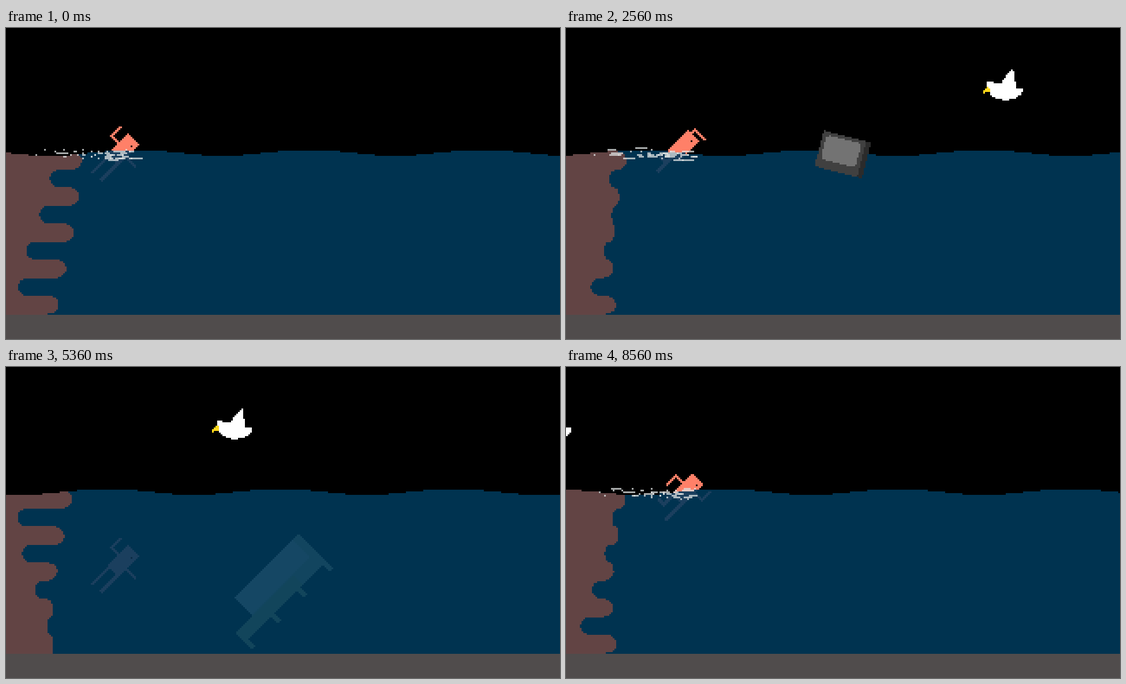
Animation, 960 px wide and 540 px high, one loop 8640 ms. Source, as an HTML page with a canvas:

```html
<!DOCTYPE html>
<html lang="en">
<head>
<meta charset="utf-8">
<title>Swimmer</title>
<style>
html, body { margin: 0; width: 100%; height: 100%; overflow: hidden; background: #000; }
canvas { display: block; width: 960px; height: 540px; }
</style>
</head>
<body>
<canvas id="stage" width="960" height="540"></canvas>
<script>
const ctx = document.getElementById('stage').getContext('2d');
const CELL = 3, COLS = 320, STEP = 80, STEPS = 108;
const SEA = '#003350', FLOOR = '#504c4c', GOO = '#624444';
const CORAL = '#ff8068', DIM = '#1b3f5e';
let step = 0;

const clamp = (v, lo, hi) => Math.max(lo, Math.min(hi, v));
const rand = (a, b) => {
  const v = Math.sin(a * 127.1 + b * 311.7 + 4.2) * 43758.5453;
  return v - Math.floor(v);
};

function cells(x, y, w, h, color) {
  ctx.fillStyle = color;
  ctx.fillRect(x * CELL, y * CELL, w * CELL, h * CELL);
}

// Top row of the water in a column
function surface(col) {
  const c = Math.cos((col * CELL + 1.5 - 525 + 50 * step) * Math.PI / 150);
  return 71 + (c < 0.45) + (c < -0.16) + (c < -0.71);
}

// Scanline fill on the coarse grid; "wet" is the colour below the surface
function fill(pts, color, wet) {
  const ys = pts.map(p => p[1]);
  const top = Math.floor(Math.min(...ys) / CELL), end = Math.ceil(Math.max(...ys) / CELL);
  for (let r = top; r <= end; r++) {
    const y = (r + 0.5) * CELL, hits = [];
    pts.forEach(([x1, y1], i) => {
      const [x2, y2] = pts[(i + 1) % pts.length];
      if (y1 <= y !== y2 <= y) hits.push(x1 + (y - y1) / (y2 - y1) * (x2 - x1));
    });
    hits.sort((a, b) => a - b);
    for (let k = 0; k + 1 < hits.length; k += 2) {
      const a = clamp(Math.round(hits[k] / CELL), 0, COLS);
      const b = clamp(Math.round(hits[k + 1] / CELL), 0, COLS);
      if (!wet) cells(a, r, b - a, 1, color);
      else for (let c = a; c < b; c++) cells(c, r, 1, 1, r < surface(c) ? color : wet);
    }
  }
}

// Tilted coordinate system around a corner
function tilt(ox, oy, degrees) {
  const a = degrees * Math.PI / 180, cos = Math.cos(a), sin = Math.sin(a);
  const at = (x, y) => [ox + x * cos - y * sin, oy + x * sin + y * cos];
  const box = (x1, y1, x2, y2, color, wet, cut = 0) => fill([
    at(x1 + cut, y1), at(x2 - cut, y1), at(x2, y1 + cut), at(x2, y2 - cut),
    at(x2 - cut, y2), at(x1 + cut, y2), at(x1, y2 - cut), at(x1, y1 + cut)
  ], color, wet);
  return { at, box };
}

// Four strokes, 120 ms each; limbs run from joint to joint, x forward, y to the belly
const poses = [
  { head: [211, 184], limbs: [[-1, -17, -22, -17, -22, 4], [-31, 27, -31, 47],
    [-49, 4, -89, 4], [-48, 24, -88, 24]] },
  { head: [211, 177], limbs: [[2, 9, 9, 9, 9, 32], [-48, 14, -86, 14], [-66, 2, -66, 14]] },
  { head: [212, 177], limbs: [[-31, 26, -31, 46, -7, 46], [-48, 14, -86, 14]] },
  { head: [219, 185], limbs: [[-43, -17, -23, -17, -23, 3], [-21, 25, -21, 44, -2, 44],
    [-73, -8, -73, 3, -49, 3], [-48, 24, -89, 24]] }
];

// Dive under the telly, rise over the sofa
const depth = n => 125 * (clamp((n - 35) / 16, 0, 1) - clamp((n - 71) / 17, 0, 1));

function swimmer() {
  const { head, limbs } = poses[Math.floor(step % 6 * STEP / 120)];
  const dy = Math.round(depth(step) / CELL) * CELL, half = 2.8;
  const { at, box } = tilt(head[0], head[1] + dy, -45);
  for (const l of limbs) {
    for (let i = 0; i + 3 < l.length; i += 2) {
      const [x1, y1, x2, y2] = l.slice(i, i + 4);
      box(Math.min(x1, x2) - half, Math.min(y1, y2) - half,
        Math.max(x1, x2) + half, Math.max(y1, y2) + half, CORAL, DIM);
    }
  }
  box(-50, 0, 0, 28, CORAL, DIM);
  const [c, r] = at(-10, 19).map(v => Math.floor(v / CELL));
  cells(c, r, 1, 1, r < surface(c) ? '#22100e' : '#0b2c45');
}

function foam() {
  for (let age = 0; age < 10; age++) {
    const born = (step - age + STEPS) % STEPS;
    if (depth(born) > 16) continue;
    const count = age < 2 ? 10 : age < 5 ? 5 : 2;
    for (let i = 0; i < count; i++) {
      const size = rand(i + 7, born);
      const x = 222 - rand(born, i) * 48 - age * 14;
      const y = 219 + (rand(born + 31, i) + rand(born + 57, i) - 1) * 11 - age * 0.5;
      cells(Math.round(x / CELL), Math.round(y / CELL), 1 + Math.floor(size * size * 7), 1,
        'rgba(222,226,226,.75)');
    }
  }
}

// Lobes (even) and notches (odd) flail in travelling waves
function gooTip(i) {
  const k = i >> 1;
  return i % 2
    ? 50 + 30 * Math.cos(0.5 + 0.8 * k - 2.587 * step)
    : 106 + 25 * Math.cos(0.55 * k + 1.425 * step);
}

function goo() {
  for (let r = 71; r < 166; r++) {
    const pos = (r * CELL + 1.5 - 230) / 31.35;
    const k = clamp(Math.round(pos), 0, 8);
    const t = clamp((pos - k) * 2, -1, 1);
    const tip = gooTip(k), gap = Math.abs(tip - gooTip(k + Math.sign(t)));
    const round = Math.min(18, gap / 2) * (1 - Math.sqrt(1 - t * t));
    const w = Math.round((k % 2 ? tip + round : tip - round) / CELL);
    if (r > 74) cells(0, r, w, 1, GOO);
    else for (let c = 0; c < w; c++) if (r >= surface(c)) cells(c, r, 1, 1, GOO);
  }
}

function bird() {
  const x = 825 - 10.43 * (step - 22), move = ([px, py]) => [x + px, py];
  const shape = [[9, 93], [18, 93], [22, 97], [33, 97], [41, 84], [53, 72],
    [56, 75], [57, 93], [60, 95], [59, 104], [72, 105]];
  for (let a = 0.2; a < Math.PI; a += 0.2) {
    shape.push([41 + 31 * Math.cos(a), 104 + 21 * Math.sin(a)]);
  }
  fill(shape.map(move), '#fff');
  fill([[11, 101], [15, 110], [8, 110], [2, 114], [1, 111]].map(move), '#ffd91a');
}

function telly() {
  const { box } = tilt(613 - 16.63 * (step - 22), 178, 14.4);
  box(0, 0, 84.5, 64, '#404040');
  box(76, 0, 84.5, 64, '#2b2b2b');
  box(7, 6, 69, 49, '#737373', null, 5);
}

function sofa() {
  const { box } = tilt(679 - 16.67 * (step - 50), 400, -45);
  const frame = '#12455f', seat = '#12455b';
  box(0, 0, 156, 68, frame);
  box(149, 0, 156, 85, frame);
  box(-42, 45, 100, 68, seat);
  for (let i = 0; i < 3; i++) box(-42 + 63.6 * i, 60, -34.5 + 63.6 * i, 85, seat);
  box(0, 0, 143, 44, '#154764');
}

function draw() {
  cells(0, 0, COLS, 180, '#000');
  for (let c = 0; c < COLS; c++) cells(c, surface(c), 1, 180, SEA);
  sofa();
  swimmer();
  bird();
  telly();
  goo();
  foam();
  cells(0, 166, COLS, 14, FLOOR);
}

let last = -1;
function tick() {
  step = Math.floor(performance.now() / STEP) % STEPS;
  if (step !== last) { last = step; draw(); }
  requestAnimationFrame(tick);
}
tick();
</script>
</body>
</html>
```
